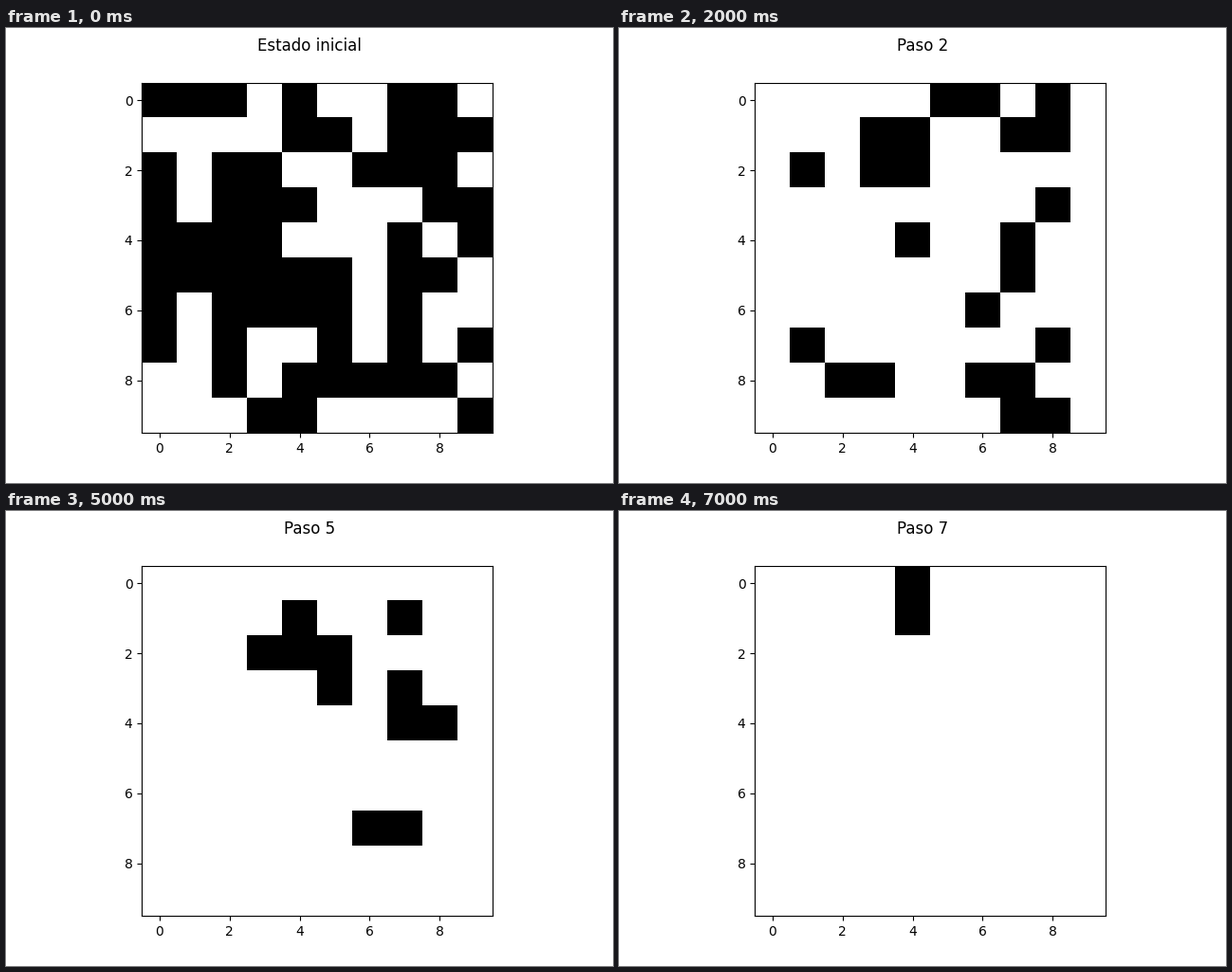
Recreate the animation shown at these times as a matplotlib script. Size 640 by 480 pixels, loop 8000 ms.

```python
import numpy as np
import matplotlib.pyplot as plt
from matplotlib.animation import FuncAnimation

STEPS = 8
SEED = """
###.#..##.
....##.###
#.##..###.
#.###...##
####...#.#
######.##.
#.####.#..
#.#..#.#.#
..#.#####.
...##....#
""".split()


def evolve(grid):
    """A cell is filled next when exactly three of its neighbours are."""
    n, m = grid.shape
    pad = np.pad(grid, 1)
    block = sum(pad[r:r + n, c:c + m] for r in range(3) for c in range(3))
    return (block - grid == 3).astype(int)


states = [np.array([[int(ch == "#") for ch in row] for row in SEED])]
while len(states) < STEPS:
    states.append(evolve(states[-1]))

plt.rcParams["font.family"] = "DejaVu Sans"
fig, ax = plt.subplots(figsize=(6.4, 4.8), dpi=100)
image = ax.imshow(states[0], cmap="binary", vmin=0, vmax=1,
                  interpolation="nearest")
title = fig.suptitle("Estado inicial", fontsize=12)


def update(step):
    image.set_data(states[step])
    title.set_text(f"Paso {step}" if step else "Estado inicial")
    return image, title


anim = FuncAnimation(fig, update, frames=STEPS, interval=1000,
                     repeat=True, repeat_delay=0, blit=False)
plt.show()
```
